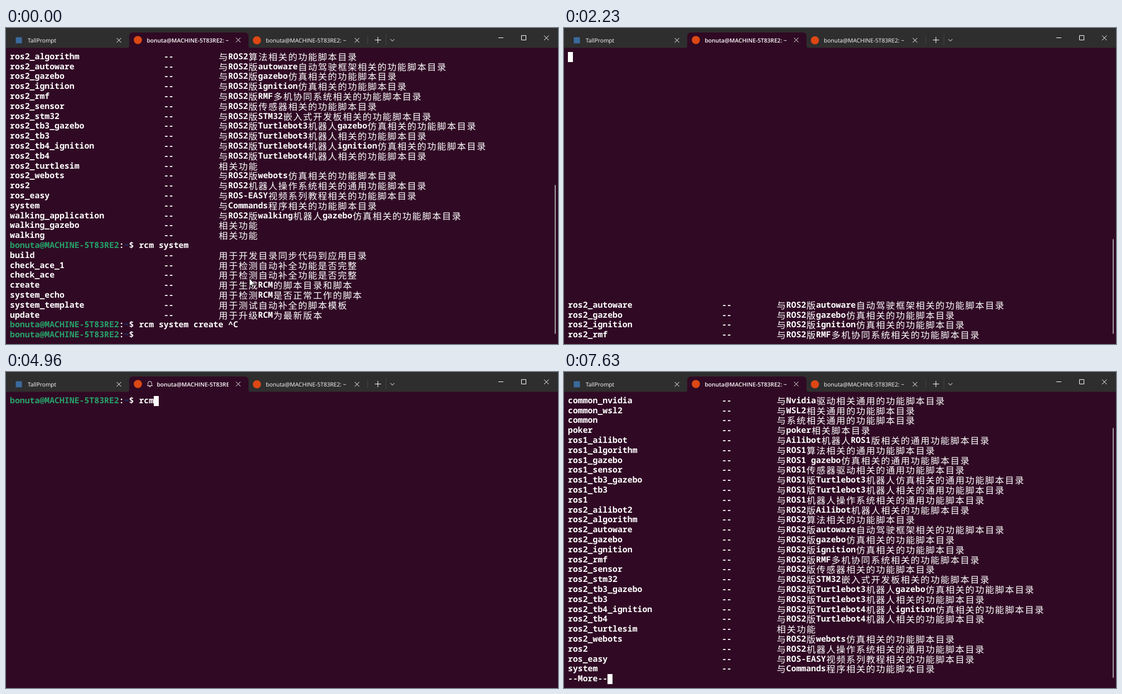
An HTML page that plays this animation: 990x566 px, repeating every 8 s.

```html
<!DOCTYPE html>
<html lang="zh-CN">
<head>
<meta charset="utf-8">
<title>Terminal</title>
<style>
html, body { margin: 0; width: 100%; height: 100%; overflow: hidden; background: #300a24; }
#stage { position: relative; width: 990px; height: 566px; overflow: hidden; background: #300a24; text-rendering: geometricPrecision; }
#chrome { position: absolute; left: 0; top: 0; }
.tab { position: absolute; top: 12px; height: 20px; line-height: 20px; overflow: hidden; white-space: pre; color: #fff; font: 10.2px/20px "Open Sans", "Noto Sans", sans-serif; }
.active { right: 591px; top: 11.5px; font-weight: 600; }
.run { position: absolute; white-space: pre; height: 17.8px; color: #fff; font: 600 14.833px/17.8px "Noto Sans Mono", monospace; }
.cjk { font: 400 16.2px/17.8px "Noto Sans CJK SC", "Noto Sans CJK", sans-serif; letter-spacing: 1.6px; margin-left: .8px; }
#caret { position: absolute; width: 9px; height: 18px; background: #fff; }
#bar { position: absolute; left: 984px; width: 2px; background: #a39aa0; border-radius: 1px; }
.mouse { position: absolute; overflow: visible; }
</style>
</head>
<body>
<div id="stage">
  <svg id="chrome" width="990" height="36" fill="none" stroke="#fff">
    <rect width="990" height="35.5" fill="#2e2e2e" stroke="none"/>
    <path d="M217 36q4 0 4-4V15q0-7 7-7H428q7 0 7 7V32q0 4 4 4z" fill="#300a24" stroke="none"/>
    <rect x="17.5" y="16.5" width="11" height="11" fill="#3a6a9c" stroke="none"/>
    <g fill="#dd4814" stroke="none"><circle cx="236.5" cy="21.5" r="7.3"/><circle cx="450" cy="22" r="7.3"/></g>
    <path d="M648.5 15v13M681.5 11v20" stroke="#444"/>
    <path d="M198.5 18l8 8m0-8l-8 8M412.500 17.500l8 8m0-8l-8 8M625.500 18l8 8m0-8l-8 8"/>
    <path d="M661.500 21.500h11m-5.500-5.500v11M689.500 20l3.500 3.500 3.500-3.500"/>
    <path d="M883 17.500h9M924.500 13.500h8v8h-8zM965 13.500l8.500 8.500m0-8.500l-8.500 8.500"/>
    <path id="bell" d="M253.500 24.500h9l-1.200-2v-2.500a3.300 3.300 0 0 0-6.600 0v2.500zM256.500 25a1.500 1.500 0 0 0 3 0" stroke-width=".9"/>
  </svg>
  <div class="tab" style="left:39px">TallPrompt</div>
  <div class="tab active" id="title">bonuta@MACHINE-5T83RE2: ~</div>
  <div class="tab" style="left:466px">bonuta@MACHINE-5T83RE2: ~</div>
  <div id="text"></div>
  <div id="caret"></div>
  <div id="bar"></div>
  <svg class="mouse" id="arrow" width="13" height="19" style="left:436px;top:448px">
    <path d="M.5.5v14l3.300-3 2.200 5 2.300-1-2.200-4.900h4.400z" fill="#fff" stroke="#000" stroke-width=".8"/>
  </svg>
  <svg class="mouse" id="beam" width="11" height="17" style="left:431px" fill="none" stroke="#fff">
    <path d="M2.500.5h2l1 1 1-1h2M5.500 1.500v14M2.500 16.500h2l1-1 1 1h2"/>
  </svg>
</div>
<script>
const CW = 8.9, CH = 17.8, LEFT = 7, TOP = 42.8, LOOP = 8000;
const $ = id => document.getElementById(id);

const scripts = `common_nvidia|与Nvidia驱动相关通用的功能脚本目录
common_wsl2|与WSL2相关通用的功能脚本目录
common|与系统相关通用的功能脚本目录
poker|与poker相关脚本目录
ros1_ailibot|与Ailibot机器人ROS1版相关的通用功能脚本目录
ros1_algorithm|与ROS1算法相关的通用功能脚本目录
ros1_gazebo|与ROS1 gazebo仿真相关的通用功能脚本目录
ros1_sensor|与ROS1传感器驱动相关的通用功能脚本目录
ros1_tb3_gazebo|与ROS1版Turtlebot3机器人仿真相关的通用功能脚本目录
ros1_tb3|与ROS1版Turtlebot3机器人相关的通用功能脚本目录
ros1|与ROS1机器人操作系统相关的通用功能脚本目录
ros2_ailibot2|与ROS2版Ailibot机器人相关的功能脚本目录
ros2_algorithm|与ROS2算法相关的功能脚本目录
ros2_autoware|与ROS2版autoware自动驾驶框架相关的功能脚本目录
ros2_gazebo|与ROS2版gazebo仿真相关的功能脚本目录
ros2_ignition|与ROS2版ignition仿真相关的功能脚本目录
ros2_rmf|与ROS2版RMF多机协同系统相关的功能脚本目录
ros2_sensor|与ROS2版传感器相关的功能脚本目录
ros2_stm32|与ROS2版STM32嵌入式开发板相关的功能脚本目录
ros2_tb3_gazebo|与ROS2版Turtlebot3机器人gazebo仿真相关的功能脚本目录
ros2_tb3|与ROS2版Turtlebot3机器人相关的功能脚本目录
ros2_tb4_ignition|与ROS2版Turtlebot4机器人ignition仿真相关的功能脚本目录
ros2_tb4|与ROS2版Turtlebot4机器人相关的功能脚本目录
ros2_turtlesim|相关功能
ros2_webots|与ROS2版webots仿真相关的功能脚本目录
ros2|与ROS2机器人操作系统相关的通用功能脚本目录
ros_easy|与ROS-EASY视频系列教程相关的功能脚本目录
system|与Commands程序相关的功能脚本目录
walking_application|与ROS2版walking机器人gazebo仿真相关的功能脚本目录
walking_gazebo|相关功能
walking|相关功能`.split('\n');

const systemHelp = `build|用于开发目录同步代码到应用目录
check_ace_1|用于检测自动补全功能是否完整
check_ace|用于检测自动补全功能是否完整
create|用于生成RCM的脚本目录和脚本
system_echo|用于检测RCM是否正常工作的脚本
system_template|用于测试自动补全的脚本模板
update|用于升级RCM为最新版本`.split('\n');

// Lines starting with "$" are prompts; "|" separates a name from its description.
const screens = {
  help: [...scripts.slice(12), '$rcm system', ...systemHelp, '$rcm system create ^C', '$'],
  wiped: [...Array(25).fill(''), ...scripts.slice(13, 17)],
  fresh: ['$'],
  rcm: ['$rcm', 'rcm      rcm-gui', '$rcm'],
  more: [...scripts.slice(0, 28), '--More--']
};

// Each step changes part of the state; caret is [column, row] or null.
const steps = [
  [0, { screen: 'help', typed: '', caret: null, bar: 281, arrow: true, beam: 0, bell: false }],
  [500, { arrow: false, beam: 455 }],
  [630, { beam: 456 }],
  [830, { caret: [26, 28] }],
  [1160, { beam: 457 }],
  [1360, { caret: null, beam: 0 }],
  [1430, { typed: 'c', caret: [27, 28] }],
  [1760, { typed: 'cl', caret: [28, 28] }],
  [1900, { typed: 'cle', caret: [29, 28] }],
  [1960, { typed: 'clea', caret: [30, 28] }],
  [2030, { typed: 'clear', caret: [31, 28] }],
  [2230, { screen: 'wiped', typed: '', caret: [0, 0], bar: 378 }],
  [2300, { screen: 'fresh', caret: [26, 0], bar: 0, beam: 457 }],
  [2830, { caret: null }],
  [3430, { caret: [26, 0] }],
  [3630, { beam: 0 }],
  [3700, { typed: 'r', caret: [27, 0] }],
  [3960, { typed: 'rc', caret: [28, 0] }],
  [4160, { typed: 'rcm', caret: [29, 0] }],
  [4700, { caret: null }],
  [4830, { caret: [29, 0] }],
  [4960, { bell: true }],
  [5300, { screen: 'rcm', typed: '', caret: [29, 2] }],
  [5760, { caret: null }],
  [5960, { typed: ' ', caret: [30, 2] }],
  [6560, { screen: 'more', typed: '', caret: [8, 28], bar: 100 }],
  [6960, { bell: false }],
  [7100, { caret: null }],
  [7630, { caret: [8, 28] }]
];
let last = {};
const states = steps.map(([, change]) => last = { ...last, ...change });

function put(box, row, col, text, color) {
  for (const part of text.match(/[\u2e80-\uffef]+|[^\u2e80-\uffef]+/g) || []) {
    const wide = part.charCodeAt(0) >= 0x2e80;
    const run = document.createElement('span');
    run.className = wide ? 'run cjk' : 'run';
    run.textContent = part;
    run.style.left = LEFT + col * CW + 'px';
    run.style.top = TOP + row * CH + 'px';
    if (color) run.style.color = color;
    box.append(run);
    col += part.length * (wide ? 2 : 1);
  }
}

function putLine(box, line, row) {
  if (line[0] === '$') {
    put(box, row, 0, 'bonuta@MACHINE-5T83RE2', '#26a269');
    put(box, row, 22, ':');
    put(box, row, 23, '~', '#12488b');
    put(box, row, 24, '$ ' + line.slice(1));
  } else if (line.includes('|')) {
    const [name, about] = line.split('|');
    put(box, row, 0, name);
    put(box, row, 31, '--');
    put(box, row, 42, about);
  } else put(box, row, 0, line);
}

const layers = {};
for (const name in screens) {
  const box = layers[name] = document.createElement('div');
  screens[name].forEach((line, row) => putLine(box, line, row));
  $('text').append(box);
}
const typing = document.createElement('div');
$('text').append(typing);

const show = (el, on) => el.style.visibility = on ? 'visible' : 'hidden';

function render(s) {
  for (const name in layers) layers[name].style.display = name === s.screen ? '' : 'none';
  typing.textContent = '';
  put(typing, s.screen === 'help' ? 28 : 0, 26, s.typed);
  show($('caret'), s.caret);
  if (s.caret) {
    $('caret').style.left = Math.round(LEFT + s.caret[0] * CW) + 'px';
    $('caret').style.top = Math.round(TOP + s.caret[1] * CH) + 'px';
  }
  show($('bar'), s.bar);
  $('bar').style.top = s.bar + 'px';
  $('bar').style.height = 548 - s.bar + 'px';
  show($('arrow'), s.arrow);
  show($('beam'), s.beam);
  $('beam').style.top = s.beam + 'px';
  show($('bell'), s.bell);
  $('title').style.left = (s.bell ? 270.5 : 252.5) + 'px';
}

let shown = -1;
function tick() {
  const t = performance.now() % LOOP;
  let i = steps.length - 1;
  while (steps[i][0] > t) i--;
  if (i !== shown) render(states[shown = i]);
  requestAnimationFrame(tick);
}
tick();
</script>
</body>
</html>
```
